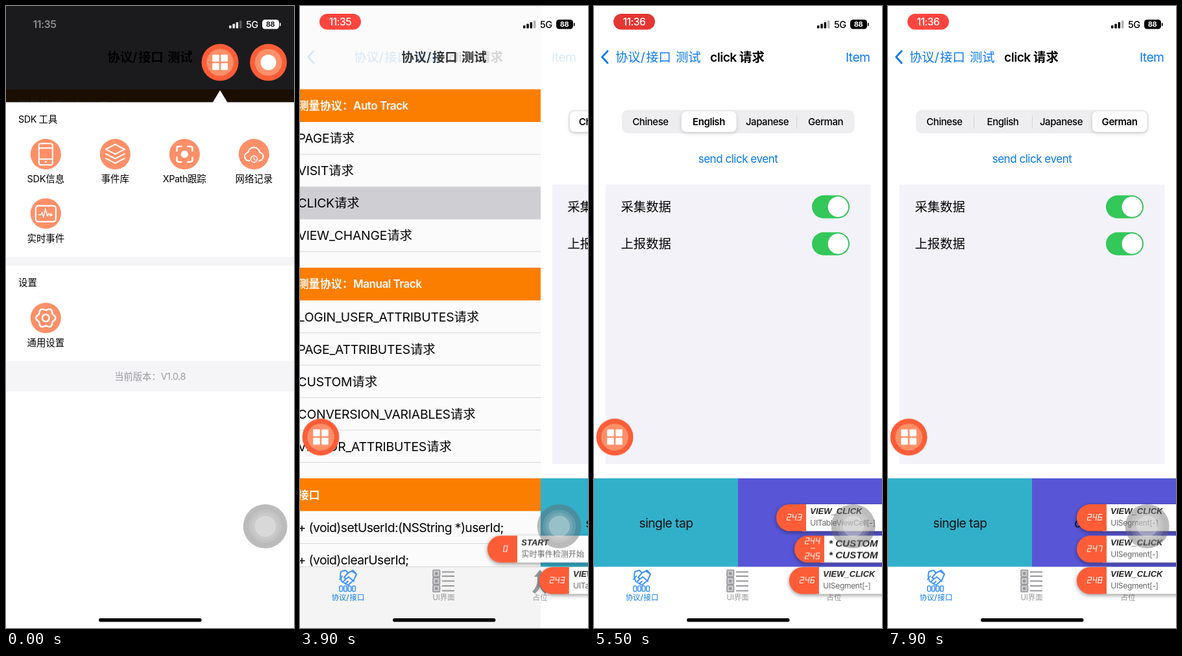
An HTML page that plays this animation: 444x960 px, repeating every 8000 ms.

```html
<!DOCTYPE html>
<html lang="zh">
<head>
<meta charset="utf-8">
<title>SDK 工具</title>
<style>
html, body { margin: 0; width: 100%; height: 100%; overflow: hidden; background: #fff; }
svg { display: block; width: 100vw; height: 100vh; }
text { font-family: Inter, "Noto Sans CJK SC", "Noto Sans CJK", sans-serif; }
tspan { letter-spacing: -.03em; }
.caps { letter-spacing: -.01em; }
.gap { letter-spacing: .08em; }
.head { font-family: "Liberation Sans", Arial, sans-serif; font-weight: 700; font-style: italic; }
.head tspan { letter-spacing: 0; }
.toast { filter: drop-shadow(0 2px 3px rgba(0, 0, 0, .42)); }
.thumb { filter: drop-shadow(0 2px 3px rgba(0, 0, 0, .16)); }
.line { fill: none; stroke: #fff; stroke-width: 2; stroke-linejoin: round; stroke-linecap: round; }
</style>
</head>
<body>
<svg id="stage" viewBox="0 0 444 960"></svg>
<script>
const LOOP = 8000;
const BLUE = '#0a7aee', RED = '#fc5d38', PEACH = '#fd9069', ORANGE = '#ff8000';
const MID = 'text-anchor="middle"', BOLD = 'font-weight="600"';

// ---- drawing helpers ----
// Latin runs are tracked by kind: capitals, separators, mixed text
const tracking = s => /^[A-Z_]+$/.test(s) ? 'caps' : /^[\/ ]+$/.test(s) ? 'gap' : '';
const text = (x, y, s, size, fill = '#000', attrs = '') =>
  `<text x="${x}" y="${y}" font-size="${size}" fill="${fill}" ${attrs}>` +
  s.replace(/[ -~]+/g, m => `<tspan class="${tracking(m)}">${m}</tspan>`) + '</text>';
const rect = (x, y, w, h, fill, r = 0, attrs = '') =>
  `<rect x="${x}" y="${y}" width="${w}" height="${h}" rx="${r}" fill="${fill}" ${attrs}/>`;
const circle = (x, y, r, fill, attrs = '') => `<circle cx="${x}" cy="${y}" r="${r}" fill="${fill}" ${attrs}/>`;
const line = (d, attrs = 'class="line"') => `<path d="${d}" ${attrs}/>`;
const stroke = (color, w) => `fill="none" stroke="${color}" stroke-width="${w}" stroke-linecap="round" stroke-linejoin="round"`;
const group = (id, body, attrs = '') => `<g id="${id}" ${attrs}>${body}</g>`;
const at = (x, y, body) => `<g transform="translate(${x} ${y})">${body}</g>`;

// ---- status bar ----
function status(fg, bg) {
  const bars = [4.5, 7, 9.5, 12].map((h, i) =>
    rect(344 + i * 5.3, 34.5 - h, 3.5, h, fg, 1, i > 2 ? 'opacity=".3"' : '')).join('');
  return bars + text(370, 34, '5G', 14.5, fg, 'font-weight="500"') +
    rect(395, 21, 26, 14.5, fg, 4.5) + rect(422, 26, 1.6, 5, fg, .8) +
    text(407.5, 32.2, '88', 11, bg, MID + ' font-weight="700"');
}

const pill = rect(30, 12, 64, 24.5, '#dc322e', 12.25, 'id="pillBg"') +
  group('rec', circle(62, 24.3, 7.4, 'none', 'stroke="#fff" stroke-width="1.7"') + circle(62, 24.3, 3.7, '#fff')) +
  ['11:35', '11:36'].map((s, i) => group('clock' + i, text(62, 29.8, s, 15.6, '#fff', MID + ' font-weight="500"'))).join('');

// ---- list page ----
const separator = (y, x = 19) => rect(x, y, 444, 1, '#dcdcde');
const row = (y, s) => text(18.5, y + 7, s, 19.35) +
  line(`M418 ${y - 5.5}l6 5.5l-6 5.5`, stroke('#c4c4c7', 2));
const section = (y, title, rows) =>
  rect(0, y, 444, 50.5, ORANGE) + text(18.5, y + 31.5, title, 17.1, '#fff', BOLD) +
  rows.map((s, i) => row(y + 75.6 + i * 50, s) + separator(y + 100 + i * 50)).join('');

const listPage = rect(0, 0, 444, 960, '#fff') +
  rect(0, 279, 444, 50, '#d1d1d6', 0, 'id="pressed"') +
  section(128.5, '测量协议：Auto Track', ['PAGE请求', 'VISIT请求', 'CLICK请求', 'VIEW_CHANGE请求']) +
  section(403.9, '测量协议：Manual Track', ['LOGIN_USER_ATTRIBUTES请求', 'PAGE_ATTRIBUTES请求',
    'CUSTOM请求', 'CONVERSION_VARIABLES请求', 'VISITOR_ATTRIBUTES请求']) +
  section(729, '接口', ['+ (void)setUserId:(NSString *)userId;', '+ (void)clearUserId;']) +
  rect(0, 865, 444, 95, '#f8f8f8') + separator(865, 0) +
  rect(0, 0, 444, 960, '#000', 0, 'id="dim"');

// ---- detail page ----
const toggle = y => rect(336, y - 17.7, 58, 35.4, '#34c759', 17.7) + circle(376.3, y, 15.7, '#fff');
const langs = ['Chinese', 'English', 'Japanese', 'German'];
const segments = rect(43, 160.5, 358.5, 36, '#eeedf0', 9) +
  [0, 1, 2].map(i => rect(132 + i * 90, 169, 1, 20, '#d4d4d9', 0, `id="sep${i}"`)).join('') +
  group('thumb', rect(45, 162.5, 84.5, 32, '#fff', 7.5, 'class="thumb"')) +
  langs.map((s, i) => ['off', 'on'].map(k => group(k + i,
    text(87 + i * 90, 184, s, 15, '#000', `${MID} font-weight="${k === 'on' ? 600 : 500}"`))).join('')).join('');

const detailPage = rect(0, 0, 444, 960, '#fff') + segments +
  text(222, 241.5, 'send click event', 17.1, BLUE, MID) +
  rect(18, 275.5, 408, 431.5, '#f3f2f9') +
  text(41.5, 317, '采集数据', 19.35) + toggle(310) +
  text(41.5, 374, '上报数据', 19.35) + toggle(367) +
  rect(0, 729, 222, 136.5, '#32b0ca') + text(111, 804.5, 'single tap', 19.35, '#111', MID) +
  rect(222, 729, 222, 136.5, '#5856d6') + text(333, 804.5, 'double tap', 19.35, '#111', MID);

const navTitle = text(222, 85.5, '协议/接口 测试', 19.35, '#000', MID + ' ' + BOLD);
const navDetail = line('M21 69.5L12.5 78.7L21 88', stroke(BLUE, 2.8)) +
  group('back', text(33, 85.5, '协议/接口 测试', 19.35, BLUE)) +
  group('navName', text(179, 85.5, 'click 请求', 19.35, '#000', BOLD)) +
  text(425.5, 85.5, 'Item', 19.35, BLUE, 'text-anchor="end"');

// ---- tab bar ----
const GREY = '#97979b';
const shake = line('M63 873l7 -2l4 4l8 -4l5 6l-4 9l-9 8l-10 -6l-2 -8z M74 875l-6 7q3 4 7 -1l8 7 M66 889l5 -5 M70 892l4 -4 M87 877l-6 -4 M65 880l-4 5', stroke('#3f95f5', 2)) +
  [0, 1, 2, 3].map(i => rect(61 + i * 6.6, 895, 4.6, 8.5, 'none', 2, 'stroke="#3f95f5" stroke-width="1.6"')).join('');
const films = [0, 1, 2].map(i => rect(205, 870.5 + i * 11.6, 10.5, 10.5, '#c9c9cc', 1, `stroke="${GREY}" stroke-width="1.6"`) +
  circle(210.2, 876 + i * 11.6, 2.4, GREY)).join('') +
  line('M219 873.5h19M219 880h19M219 887.5h19M219 895h19M219 902.5h19', `stroke="${GREY}" stroke-width="1.8"`);
const merge = line('M370 870l9 11h-5v7q1 9 8 16l-4 3q-7 -6 -8 -11q-1 5 -8 11l-4 -3q7 -7 8 -16v-7h-5z', `fill="${GREY}"`);
const tabs = shake + films + merge +
  text(74, 917, '协议/接口', 11.4, BLUE, MID + ' font-weight="500"') +
  text(221.5, 917, 'UI界面', 11.4, GREY, MID) + text(370, 917, '占位', 11.4, GREY, MID);

// ---- tool menu ----
const gear = Array.from({ length: 73 }, (_, i) => {
  const a = i * Math.PI / 36, r = 13.6 + 1.5 * Math.cos(6 * a + Math.PI);
  return (i ? 'L' : 'M') + (r * Math.sin(a)).toFixed(1) + ' ' + (r * Math.cos(a)).toFixed(1);
}).join('');
const icons = {
  phone: line('M-7.5 -16.5h15q3 0 3 3v27q0 3 -3 3h-15q-3 0 -3 -3v-27q0 -3 3 -3zM-10 -9.5h20M-10 7.5h20') + circle(0, 12, 1.4, '#fff'),
  layers: line('M0 -15l14.5 7.5l-14.5 7.5l-14.5 -7.5zM-14.5 -.5l14.5 7.5l14.5 -7.5M-14.5 6.5l14.5 7.5l14.5 -7.5'),
  scan: line('M-12 -5v-4q0 -3 3 -3h4M5 -12h4q3 0 3 3v4M12 5v4q0 3 -3 3h-4M-5 12h-4q-3 0 -3 -3v-4', stroke('#fff', 2.6)) + circle(0, 0, 5.6, '#fff'),
  cloud: line('M-7 10h-1.5a6.5 6.5 0 0 1 -.8 -12.8a9.3 9.3 0 0 1 18.3 0a6.5 6.5 0 0 1 -.2 12.8h-1') +
    circle(0, 7.5, 5, 'none', 'stroke="#fff" stroke-width="1.4"') + line('M0 4.7v3l2 1.5', stroke('#fff', 1.2)),
  pulse: rect(-15.5, -12, 31, 24.5, 'none', 4, 'stroke="#fff" stroke-width="2.2"') +
    line('M-11 2h3.5l2 -4l2 8l3 -13l3 11l2 -4l1.5 2h2', stroke('#fff', 1.5)) + circle(8, 2, 1.7, 'none', 'stroke="#fff" stroke-width="1.2"'),
  gear: line(gear, stroke('#fff', 2.5)) + circle(0, 0, 5.4, 'none', 'stroke="#fff" stroke-width="2.5"')
};
const tool = (x, y, icon, label) => at(x, y, circle(0, 0, 23.6, PEACH) + icons[icon] + text(0, 43.5, label, 14.4, '#000', MID));
const disc = circle(0, 0, 28.5, RED) + circle(0, 0, 20.8, PEACH);

const menu = rect(0, 0, 444, 960, '#010004', 0, 'opacity=".895"') + status('#fff', '#1c1b1f') +
  rect(0, 148.5, 444, 812, '#fff') + line('M330 130l11.5 19h-23z', 'fill="#fff"') +
  at(404.5, 87, disc + circle(0, 0, 12, '#fff')) +
  text(19, 179.5, 'SDK 工具', 14.4) +
  tool(61.3, 228.7, 'phone', 'SDK信息') + tool(168.3, 228.7, 'layers', '事件库') +
  tool(275.3, 228.7, 'scan', 'XPath跟踪') + tool(382.3, 228.7, 'cloud', '网络记录') +
  tool(61.3, 320.3, 'pulse', '实时事件') +
  rect(0, 387, 444, 14, '#f5f5f8') + text(19, 432, '设置', 14.4) +
  tool(61.3, 481.5, 'gear', '通用设置') +
  rect(0, 547.5, 444, 47.5, '#f5f5f8') + text(222, 577, '当前版本：V1.0.8', 14.3, '#9b9b9f', MID);

const knob = disc + [-11.8, 1.3].map(x => [-11.8, 1.3].map(y => rect(x, y, 10.5, 10.5, '#fff', .8)).join('')).join('');

// ---- event toasts ----
const SEG = { a: 'M0 0h5', b: 'M5 0v4.5', c: 'M5 4.5v4.5', d: 'M0 9h5', e: 'M0 4.5v4.5', f: 'M0 0v4.5', g: 'M0 4.5h5' };
const DIGIT = { 0: 'abcdef', 2: 'abged', 3: 'abgcd', 4: 'fgbc', 5: 'afgcd', 6: 'afgedc', 7: 'abc', 8: 'abcdefg' };
const number = (s, y) => [...s].map((ch, i) =>
  `<g transform="translate(${28.5 + (i - s.length / 2) * 8.2 + 1.6} ${y - 4.5}) skewX(-9)">` +
  line([...DIGIT[ch]].map(k => SEG[k]).join(''), stroke('#fff', 1.1)) + '</g>').join('');

const SEGMENT = 'UISegment[-]';
// x, first shift time, numbers, title, subtitle
const toasts = [
  [289, 2050, ['0'], 'START', '实时事件检测开始'],
  [281, 3600, ['243'], 'VIEW_CLICK', 'UITableViewCell[-]'],
  [309, 4300, ['244', '245'], '* CUSTOM', ''],
  [291, 5060, ['246'], 'VIEW_CLICK', SEGMENT],
  [291, 5900, ['247'], 'VIEW_CLICK', SEGMENT],
  [291, 7050, ['248'], 'VIEW_CLICK', SEGMENT]
];
const toast = ([x, , nums, title, sub], i) => {
  const twin = nums.length > 1;
  const body = rect(40, 0, 200, 41.5, '#fff') + line('M46 0H20.7a20.75 20.75 0 0 0 0 41.5H46z', `fill="${RED}"`) +
    (twin ? number(nums[0], 8) + line('M25.5 19.5h6', stroke('#fff', 1)) + number(nums[1], 31.3) : number(nums[0], 20)) +
    (twin ? [17.2, 34.7].map(y => text(53, y, title, 15.2, '#222', 'class="head"')).join('')
      : text(52.3, 14.8, title, 13, '#222', 'class="head"') + text(52.3, 32.6, sub, 12.1, '#666'));
  return group('rise' + i, at(x, 0, group('slide' + i, body, 'class="toast"')));
};

const touch = circle(399.7, 803, 34, '#68686c', 'opacity=".45"') + circle(399.7, 803, 25.5, '#fff', 'opacity=".12"') +
  circle(399.7, 803, 21, '#fff', 'opacity=".1"') + circle(399.7, 803, 16.3, '#fff', 'opacity=".28"');

document.getElementById('stage').innerHTML =
  group('list', listPage) + group('detail', detailPage) +
  group('navA', navTitle) + group('navB', navDetail) + tabs + status('#000', '#fff') +
  toasts.map(toast).join('') + group('menu', menu) + group('knob', knob) + touch +
  group('idle', text(59.5, 34, '11:35', 16, '#8b8a8d', MID + ' ' + BOLD)) + group('pill', pill) +
  rect(143, 945, 158.5, 5.6, '#000', 2.8);

// ---- motion: steps are [time, value, easing] ----
function play(id, prop, steps, easing = 'ease-in-out') {
  const all = [[0, steps[0][1]], ...steps, [LOOP, steps[steps.length - 1][1]]];
  document.getElementById(id).animate(
    all.map(([t, v, e]) => ({ offset: t / LOOP, [prop]: v, easing: e || easing })),
    { duration: LOOP, iterations: Infinity });
}
const fade = (id, ...steps) => play(id, 'opacity', steps, 'linear');
const move = (id, steps, easing) =>
  play(id, 'transform', steps.map(([t, x, y]) => [t, `translate(${x}px, ${y}px)`]), easing);
const swap = (id, t, from, to) => fade(id, [t, from], [t, to]);

fade('idle', [100, 1], [400, 0]);
fade('pill', [100, 0], [600, 1]);
const DARK = '#dc322e', BRIGHT = '#ff453f', pulse = [];
for (let t = 1400; t < LOOP; t += 2000) {
  pulse.push([t, DARK], [t + 300, BRIGHT]);
  if (t + 1400 <= LOOP) pulse.push([t + 1000, BRIGHT], [t + 1400, DARK]);
}
play('pillBg', 'fill', pulse);
swap('rec', 3500, 1, 0);
fade('clock0', [3500, 0], [3500, 1], [4600, 1], [4600, 0]);
swap('clock1', 4600, 0, 1);

fade('menu', [2080, 1], [2350, 0]);
move('knob', [[2080, 330, 87], [2450, 32, 665.3]]);

const PUSH = 3860, PUSHED = PUSH + 500, NAV = 'cubic-bezier(.38, .7, .125, 1)';
swap('pressed', 3600, 0, 1);
move('list', [[PUSH, 0, 0], [PUSHED, -133, 0]], NAV);
move('detail', [[PUSH, 444, 0], [PUSHED, 0, 0]], NAV);
play('dim', 'opacity', [[PUSH, 0], [PUSHED, .1]], NAV);
fade('navA', [PUSH, 1], [PUSH + 200, 0]);
fade('navB', [PUSH, 0], [PUSH + 280, 1]);
for (const id of ['back', 'navName']) move(id, [[PUSH, 60, 0], [PUSHED, 0, 0]], NAV);

const taps = [4810, 5660, 6800], SLIDE = 300;
move('thumb', taps.flatMap((t, i) => [[t, i * 90, 0], [t + SLIDE, (i + 1) * 90, 0]]));
// fades an element according to the selected segment
const bySegment = (id, level) => fade(id, ...taps.flatMap((t, i) => [[t, level(i)], [t + SLIDE, level(i + 1)]]));
langs.forEach((_, n) => {
  bySegment('on' + n, i => i === n ? 1 : 0);
  bySegment('off' + n, i => i === n ? 0 : 1);
  if (n < 3) bySegment('sep' + n, i => i === n || i === n + 1 ? 0 : 1);
});

const SLOT = 866, STEP = 48.5;
toasts.forEach(([x, start], i) => {
  const later = toasts.slice(i + 1, i + 4).map(t => t[1]);
  move('rise' + i, [[0, 0, SLOT],
    ...later.flatMap((t, k) => [[t, 0, SLOT - k * STEP], [t + 300, 0, SLOT - (k + 1) * STEP]])]);
  move('slide' + i, [[start + 200, 454 - x, 0], [start + 500, 0, 0]], 'ease-out');
  if (later.length === 3) fade('slide' + i, [later[2] + 280, 1], [later[2] + 430, 0]);
});
</script>
</body>
</html>
```
